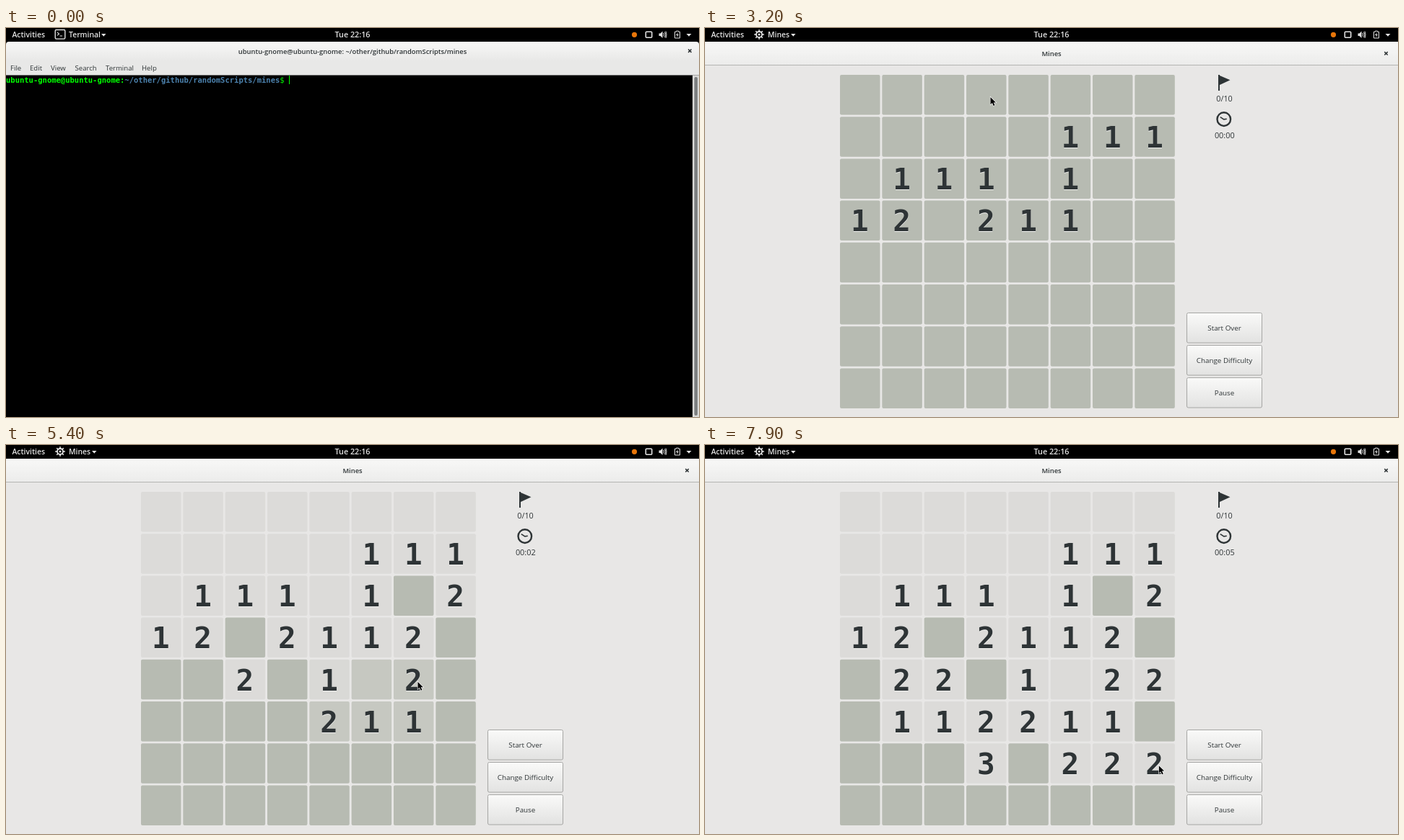
Animation, 960 px wide and 540 px high, one loop 8000 ms. Source, as an HTML page with a canvas:

```html
<!DOCTYPE html>
<html lang="en">
<head>
<meta charset="utf-8">
<title>Mines solver</title>
<style>
html, body { margin: 0; height: 100%; overflow: hidden; background: #000; }
canvas { display: block; }
</style>
</head>
<body>
<canvas id="stage" width="960" height="540"></canvas>
<script>
const ctx = document.getElementById('stage').getContext('2d');
const LOOP = 8000, STEP = 100, FADE = 350;
const UI = '"Open Sans", "Noto Sans", sans-serif';
const MONO = '"DejaVu Sans Mono", monospace';
const INK = '#2e3436', BAR = '#e2e2e2', GREEN = '#00ff00';

const clamp = v => Math.max(0, Math.min(1, v));
const smooth = v => v * v * (3 - 2 * v);

function mix(a, b, p) {
  const part = (s, i) => parseInt(s.slice(i, i + 2), 16);
  return `rgb(${[1, 3, 5].map(i => Math.round(part(a, i) + (part(b, i) - part(a, i)) * p))})`;
}
function text(s, x, y, size, color, align = 'left', weight = 400, family = UI) {
  ctx.font = `${weight} ${size}px ${family}`;
  ctx.textAlign = align;
  ctx.fillStyle = color;
  ctx.fillText(s, x, y);
}
function rect(x, y, w, h, fill, radius = 0, stroke) {
  ctx.beginPath();
  ctx.roundRect(x, y, w, h, radius);
  if (fill) { ctx.fillStyle = fill; ctx.fill(); }
  if (stroke) { ctx.strokeStyle = stroke; ctx.stroke(); }
}
function shape(d, fill, stroke, width = 1) {
  const path = new Path2D(d);
  ctx.lineWidth = width;
  if (stroke) { ctx.strokeStyle = stroke; ctx.stroke(path); }
  if (fill) { ctx.fillStyle = fill; ctx.fill(path); }
  ctx.lineWidth = 1;
}
function disc(x, y, r, fill, stroke, width) {
  shape(`M${x - r} ${y}a${r} ${r} 0 1 0 ${2 * r} 0a${r} ${r} 0 1 0 ${-2 * r} 0`, fill, stroke, width);
}
function gradient(y0, y1, top, bottom) {
  const g = ctx.createLinearGradient(0, y0, 0, y1);
  g.addColorStop(0, top);
  g.addColorStop(1, bottom);
  return g;
}

function topBar(app) {
  rect(0, 0, 960, 19, '#000');
  text('Activities', 8.5, 13.3, 10.4, BAR, 'left', 600);
  text('Tue 22:16', 480, 13.3, 10.8, BAR, 'center', 600);
  text(app, 87, 13.3, 10.4, BAR, 'left', 600);
  const arrow = app === 'Mines' ? 119 : 132;
  shape(`M${arrow} 8h6.5l-3.25 3.8z`, BAR);
  if (app === 'Mines') {
    disc(75, 9, 4, null, BAR, 1.8);
    disc(75, 9, 1.6, BAR);
    for (let i = 0; i < 8; i++) {
      const c = Math.cos(i * Math.PI / 4), s = Math.sin(i * Math.PI / 4);
      shape(`M${75 + 4 * c} ${9 + 4 * s}L${75 + 6.8 * c} ${9 + 6.8 * s}`, null, BAR, 1.6);
    }
  } else {
    ctx.lineWidth = 1.4;
    rect(68.2, 2.5, 13.6, 12.6, null, 1.5, BAR);
    shape('M71 6l2.5 2.2-2.5 2.2M74.5 11h3.5', null, BAR, 1.1);
  }
  disc(870.5, 9.3, 3.6, '#e8760a');
  ctx.lineWidth = 1.6;
  rect(886.3, 5.3, 8.4, 8, null, 1, BAR);
  shape('M904.5 7.5h2l3-3v9.5l-3-3h-2z', BAR);
  shape('M910.8 7q1.5 2.2 0 4.5M912.5 5.5q2.6 3.8 0 7.5M914 4.5q2 4.8 0 9.5', null, BAR);
  shape('M928.5 5.2v-1h3v1h2v8.8h-7v-8.8z', null, BAR);
  shape('M931 6l-3 4h2l-1 3 3-4h-2z', BAR);
  shape('M942.5 8h7l-3.5 3.8z', BAR);
}

function cross(x, y, color) {
  shape(`M${x - 2.2} ${y - 2.2}l4.4 4.4m0 -4.4l-4.4 4.4`, null, color, 1.5);
}

// Characters are typed in two bursts, then the name is completed.
function typed(t) {
  if (t >= 1200) return 'py solver.py ';
  const n = t < 600 ? Math.min(3, t / STEP) : 3 + Math.min(5, (t - 500) / STEP);
  return 'py solver'.slice(0, n);
}

function terminal(t) {
  rect(0, 19, 960, 28, gradient(19, 46, '#f8f8f7', '#e8e8e7'), [4, 4, 0, 0]);
  rect(0, 46, 960, 19.5, '#e8e8e7');
  text('ubuntu-gnome@ubuntu-gnome: ~/other/github/randomScripts/mines', 480, 36, 9.4, INK, 'center', 600);
  cross(947.3, 31.7, INK);
  [['File', 6], ['Edit', 33], ['View', 62], ['Search', 95.5], ['Terminal', 138], ['Help', 188]]
    .forEach(([s, x]) => text(s, x, 59.4, 9.6, INK));
  rect(951, 65.5, 9, 474.5, '#d9d9d7');
  rect(953.5, 68, 4.5, 470, '#7c7f80', 2.2);

  const cell = 6.322;
  let col = 0;
  const put = (s, color, weight) => {
    text(s, col * cell, 75.6, 10.5, color, 'left', weight, MONO);
    col += s.length;
  };
  put('ubuntu-gnome@ubuntu-gnome:', GREEN, 700);
  put('~/other/github/randomScripts/mines', '#4c82ae', 700);
  put('$ ', GREEN, 400);
  put(typed(t), GREEN, 400);
  if (t < 1300) rect(Math.round(col * cell), 66, 1, 12, GREEN);
  else rect(0, 78, 1, 12.5, GREEN);
}

// Dots are covered at the end, 0 is an empty open cell.
const BOARD = ['00000000', '00000111', '011101.2', '12.2112.', '.22.1022', '.112211.', '...3.222', '........'];

const clicks = [{ r: 0, c: 3, at: 3200 }];
function burst(start, cells) {
  cells.forEach(([r, c], i) => clicks.push({ r, c, at: start + i * 140 }));
}
burst(4690, [[2, 7], [3, 6], [4, 2], [4, 4], [4, 5], [4, 6]]);
burst(6250, [[4, 1], [4, 7], [5, 1], [5, 2], [5, 3], [6, 3]]);
burst(7090, [[6, 5], [6, 6], [6, 7]]);

// A click on an empty cell also opens its neighbours.
const openAt = {};
function open(r, c, at) {
  const n = BOARD[r]?.[c];
  if (n === undefined || n === '.' || openAt[[r, c]] !== undefined) return;
  openAt[[r, c]] = at;
  if (n !== '0') return;
  for (let y = -1; y < 2; y++) for (let x = -1; x < 2; x++) open(r + y, c + x, at);
}
clicks.forEach(({ r, c, at }) => open(r, c, at));

const cellX = c => 187 + c * 58.33;
const cellY = r => 65 + r * 58.2;

function button(label, y, enabled, focus) {
  const fill = enabled ? gradient(y, y + 42, '#fafaf9', '#e2e2e1') : '#f2f2f1';
  rect(667.5, y + .5, 104, 41.5, fill, 2, mix('#bbbbb9', '#a6a6a4', focus));
  const ink = enabled ? mix('#8b8e8f', INK, focus) : mix('#c6c7c6', '#919494', focus);
  text(label, 719.5, y + 24.7, 9.8, ink, 'center');
}

function mines(t) {
  const focus = clamp((t - 1800) / 250);
  const ink = mix('#8b8e8f', INK, focus);
  rect(0, 19, 960, 521, mix('#ebebea', '#e8e7e6', focus));
  rect(0, 19, 960, 32, gradient(19, 51, mix('#ededec', '#f8f8f7', focus), mix('#ebebea', '#ececeb', focus)), [4, 4, 0, 0]);
  rect(0, 51, 960, 1, mix('#c4c4c2', '#b4b4b2', focus));
  text('Mines', 480, 39.3, 9.4, ink, 'center', 600);
  cross(943.5, 35.3, ink);

  for (let r = 0; r < 8; r++) for (let c = 0; c < 8; c++) {
    const at = openAt[[r, c]] ?? Infinity, x = cellX(c), y = cellY(r);
    const p = smooth(clamp((t - at) / FADE));
    rect(x, y, 55.5, 55.5, mix('#b7bbb2', '#dcdbd9', p), 2);
    if (t >= at && BOARD[r][c] !== '0') {
      text(BOARD[r][c], x + 27.3, y + 43.8, 41, '#f2f2f0', 'center', 700, MONO);
      text(BOARD[r][c], x + 27.3, y + 42.8, 41, INK, 'center', 700, MONO);
    }
  }

  shape('M711 65h2v1l14.5 6.3-14.5 6.7v8h-2z', ink);
  text('0/10', 719.5, 101.5, 10.8, ink, 'center');
  disc(718.8, 126.6, 9.3, null, ink, 2.4);
  shape('M713.8 123.6l5 3.2 4-.6', null, ink, 1.6);
  const seconds = Math.max(0, Math.floor((t - 2700) / 1000));
  text('00:0' + seconds, 719.8, 152.7, 10.9, ink, 'center');

  const started = t >= clicks[0].at;
  button('Start Over', 395, started, focus);
  button('Change Difficulty', 440, true, focus);
  button('Pause', 485, started, focus);

  const last = clicks.filter(k => k.at <= t).pop();
  const [x, y] = last ? [cellX(last.c) + 33.5, cellY(last.r) + 31] : [728.5, 415];
  shape(`M${x} ${y}v10.2l2.4-2.2 1.8 4 1.8-.8-1.8-3.8h3.2z`, '#000', '#fff', 1.2);
}

function frame(now) {
  const t = Math.floor(now % LOOP / STEP) * STEP;
  ctx.lineWidth = 1;
  rect(0, 0, 960, 540, '#000');
  const playing = t >= 1800;
  topBar(playing ? 'Mines' : 'Terminal');
  ctx.lineWidth = 1;
  (playing ? mines : terminal)(t);
  requestAnimationFrame(frame);
}
frame(performance.now());
</script>
</body>
</html>
```
